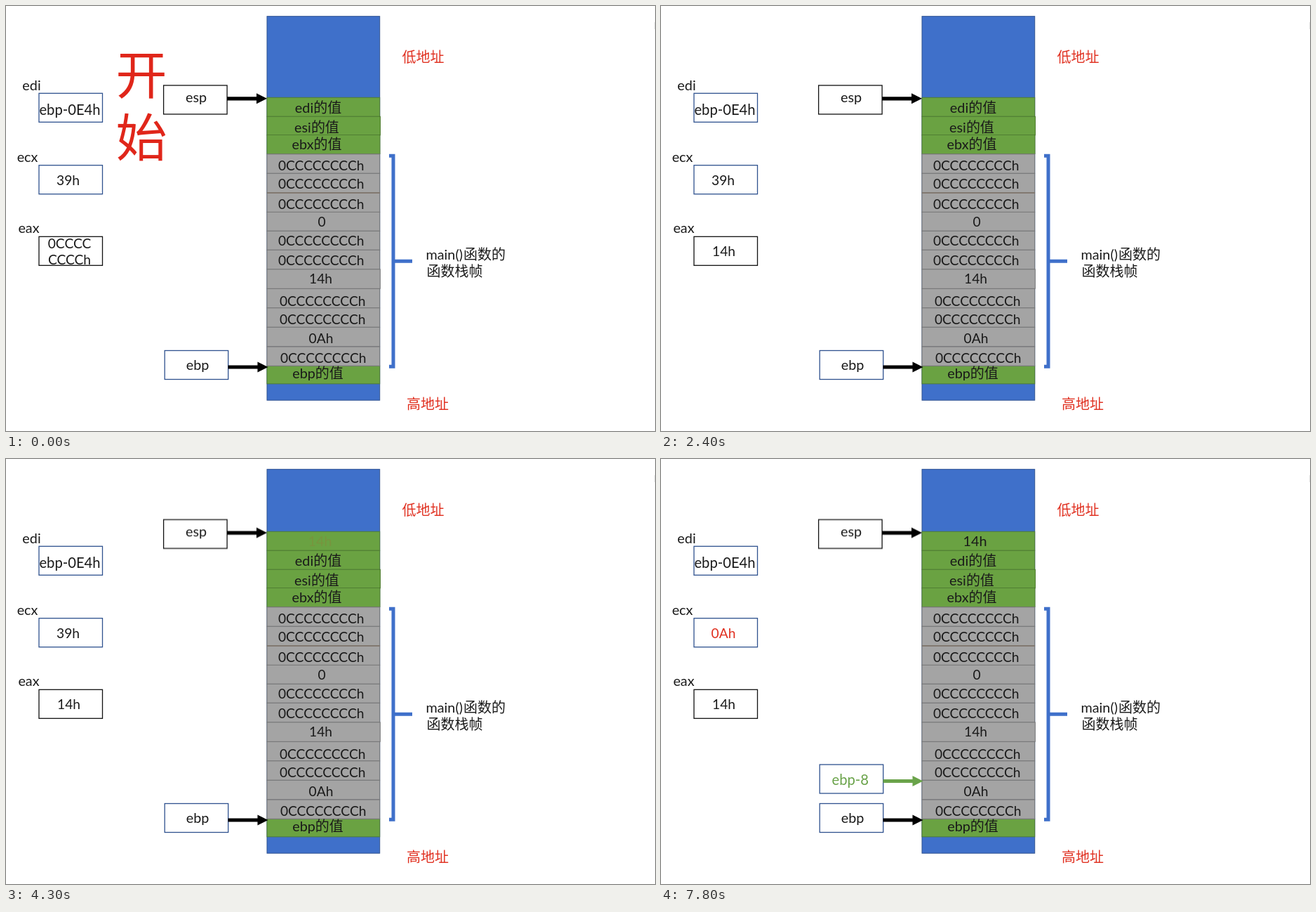
Recreate the animation shown at these times as an HTML page. Size 925 px wide and 605 px high, loop 8 s.

```html
<!DOCTYPE html>
<html lang="zh-CN">
<head>
<meta charset="utf-8">
<title>函数栈帧</title>
<style>
html, body { margin: 0; width: 100%; height: 100%; overflow: hidden; background: #fff; }
svg { display: block; width: 925px; height: 605px; }
text { font: 400 19.8px Lato, "Noto Sans CJK SC", "Noto Sans CJK", sans-serif; text-anchor: middle; fill: #1a1a1a; }
.c { font: 350 20px "Noto Sans CJK SC", "Noto Sans CJK", sans-serif; }
.hex { font-size: 19.2px; }
.left { text-anchor: start; }
.note { fill: #e03020; text-anchor: start; }
.big { font: 350 73px "Noto Sans CJK SC", "Noto Sans CJK", sans-serif; fill: #e0261a; }
.lime { fill: #6aa34a; }
.blue { fill: #3f70ca; stroke: #2f528f; }
.green { fill: #6aa242; stroke: #507e32; }
.gray { fill: #a4a4a4; stroke: #777; }
.box { fill: #fff; stroke: #2f528f; stroke-width: 1.3; }
.dark { stroke: #111; }
.brace { fill: none; stroke: #3f70ca; stroke-width: 5; }

.start, .eax-old, .eax-new, .ptr14, .ptr8, .slot, .pushed, .ecx-old, .ecx-new, .esp {
  animation: 8s linear infinite both;
}
.start, .eax-old { animation-name: clear; }
.eax-new { animation-name: load-eax; }
.ptr14 { animation-name: point14; }
.ptr8 { animation-name: point8; }
.slot { animation-name: grow; }
.pushed { animation-name: push; }
.ecx-old { animation-name: drop-ecx; }
.ecx-new { animation-name: load-ecx; fill: #e03020; }
.esp { animation-name: climb; }

@keyframes clear { 0%, 11.3% { opacity: 1; } 13.25%, 100% { opacity: 0; } }
@keyframes load-eax {
  0%, 13.75% { opacity: 0; }
  17.5%, 100% { opacity: 1; }
  0%, 24.4% { fill: #e03020; }
  30%, 100% { fill: #1a1a1a; }
}
@keyframes point14 {
  0%, 2.1% { opacity: 0; }
  5.6%, 24.4% { opacity: 1; }
  27.5%, 100% { opacity: 0; }
}
@keyframes climb {
  0%, 33.6% { transform: translateY(0); animation-timing-function: cubic-bezier(.455, .03, .515, .955); }
  45.3%, 100% { transform: translateY(-26.7px); }
}
@keyframes grow { 0%, 40.25% { opacity: 0; } 43.4%, 100% { opacity: 1; } }
@keyframes push {
  0%, 53.4% { opacity: 0; }
  56.5%, 100% { opacity: 1; }
  0%, 63.1% { fill: #e03020; }
  68.75%, 100% { fill: #1a1a1a; }
}
@keyframes point8 { 0%, 79.4% { opacity: 0; } 82.4%, 100% { opacity: 1; } }
@keyframes drop-ecx { 0%, 88% { opacity: 1; } 90.5%, 100% { opacity: 0; } }
@keyframes load-ecx { 0%, 91% { opacity: 0; } 94.75%, 100% { opacity: 1; } }
</style>
</head>
<body>
<svg viewBox="0 0 925 605">
  <defs>
    <rect id="cell" width="90.5" height="41"/>
    <path id="arrow" d="M0-2.6H42V-7.5L57 0 42 7.5V2.6H0Z"/>
  </defs>

  <!-- stack -->
  <rect class="blue" x="372" y="14.7" width="160.7" height="546.5"/>
  <rect class="green slot" x="372" y="103.3" width="160.7" height="27"/>
  <g class="green">
    <rect x="372" y="130.3" width="160.7" height="27"/>
    <rect x="372" y="157.3" width="161.5" height="26.5"/>
    <rect x="372" y="183.5" width="161" height="27"/>
    <rect x="372" y="512.3" width="160.7" height="25.5"/>
  </g>
  <g class="gray">
    <rect x="372" y="210.8" width="160.7" height="27.5"/>
    <rect x="372" y="238.3" width="160.7" height="27.5"/>
    <rect x="372" y="266" width="160.7" height="27.5"/>
    <rect x="372" y="293.3" width="160.7" height="27"/>
    <rect x="372" y="320.3" width="160.7" height="27"/>
    <rect x="372" y="347.3" width="160.7" height="27.5"/>
    <rect x="372" y="402.3" width="160.7" height="27.5"/>
    <rect x="372" y="374.8" width="161.3" height="27.5"/>
    <rect x="372" y="429.8" width="160.7" height="27.5"/>
    <rect x="372" y="457.3" width="160.7" height="27.5"/>
    <rect x="372" y="485" width="160.7" height="27.3"/>
  </g>
  <path d="M372 266H533" stroke="#82766a" stroke-width="1.6"/>

  <text class="pushed" x="447.5" y="124">14h</text>
  <text x="445" y="152">edi<tspan class="c">的值</tspan></text>
  <text x="443" y="179.5">esi<tspan class="c">的值</tspan></text>
  <text x="443" y="204">ebx<tspan class="c">的值</tspan></text>
  <text class="hex" x="449.2" y="233.5">0CCCCCCCCh</text>
  <text class="hex" x="449.2" y="259.5">0CCCCCCCCh</text>
  <text class="hex" x="449.2" y="289">0CCCCCCCCh</text>
  <text class="hex" x="450" y="314">0</text>
  <text class="hex" x="449.2" y="341">0CCCCCCCCh</text>
  <text class="hex" x="449.2" y="369">0CCCCCCCCh</text>
  <text class="hex" x="448.5" y="395">14h</text>
  <text class="hex" x="451.2" y="426.5">0CCCCCCCCh</text>
  <text class="hex" x="451.2" y="453">0CCCCCCCCh</text>
  <text class="hex" x="449" y="480">0Ah</text>
  <text class="hex" x="452.2" y="508">0CCCCCCCCh</text>
  <text x="444.5" y="530">ebp<tspan class="c">的值</tspan></text>

  <!-- frame bracket and notes -->
  <path class="brace" d="M546 213.3H552V513.3H546M552 363.3H579"/>
  <text class="left" x="598.5" y="360.5" font-size="20">main()<tspan class="c" dx="1">函数的</tspan></text>
  <text class="left c" x="599.5" y="385">函数栈帧</text>
  <text class="note c" x="564.5" y="79.5">低地址</text>
  <text class="note c" x="571" y="573.5">高地址</text>
  <path d="M924.5 23V33" stroke="#e6e6e6"/>

  <!-- registers -->
  <text x="36.5" y="120">edi</text>
  <use href="#cell" class="box" x="47" y="124.3"/>
  <text x="91" y="155" style="font-size: 20.2px">ebp-0E4h</text>
  <text x="30.5" y="222">ecx</text>
  <use href="#cell" class="box" x="47" y="226.7"/>
  <text class="ecx-old hex" x="88.5" y="254.5">39h</text>
  <text class="ecx-new hex" x="89" y="254.5">0Ah</text>
  <text x="32.5" y="323">eax</text>
  <use href="#cell" class="box dark" x="47" y="328.3"/>
  <g class="eax-old">
    <text class="hex" x="90.5" y="344.5">0CCCC</text>
    <text class="hex" x="90.5" y="368">CCCCh</text>
  </g>
  <text class="eax-new hex" x="89.5" y="355.5">14h</text>

  <g class="start">
    <text class="big" x="193" y="124.5">开</text>
    <text class="big" x="193" y="213.8">始</text>
  </g>

  <!-- pointers -->
  <g class="esp">
    <use href="#cell" class="box dark" x="224.6" y="113"/>
    <text x="271" y="136.5">esp</text>
    <use href="#arrow" x="315" y="131.8"/>
  </g>
  <use href="#cell" class="box" x="226.2" y="490.5"/>
  <text x="273" y="517.5">ebp</text>
  <use href="#arrow" x="316.5" y="514"/>
  <g class="ptr14">
    <use href="#cell" class="box" x="226.2" y="353.5"/>
    <text class="lime" x="273" y="383" style="font-size: 20.2px">ebp-14h</text>
    <use href="#arrow" class="lime" x="316.5" y="374.8"/>
  </g>
  <g class="ptr8">
    <use href="#cell" class="box" x="226.2" y="435"/>
    <text class="lime" x="269.8" y="464" style="font-size: 20.2px">ebp-8</text>
    <use href="#arrow" class="lime" x="316.5" y="458.5"/>
  </g>
</svg>
</body>
</html>
```
